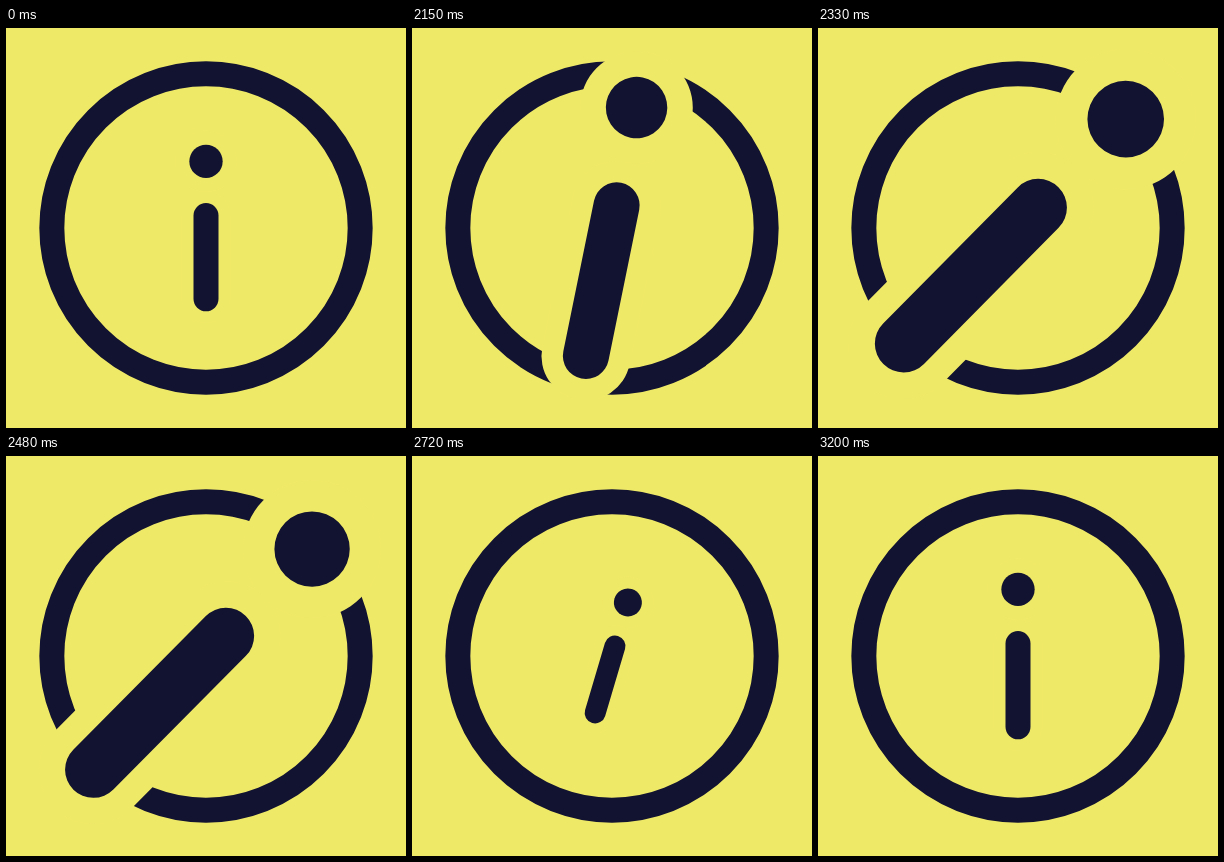
Write an HTML page that moves like this. It is 400 px wide and 400 px high and loops after 3.26 s.

```html
<!DOCTYPE html>
<html lang="en">
<head>
<meta charset="utf-8">
<title>Info icon</title>
<style>
  html, body { margin: 0; height: 100%; overflow: hidden; background: #efe968; }
  svg { display: block; width: 100%; height: 100%; }
  line { stroke-linecap: round; }
  .ink { fill: #121331; stroke: #121331; }
  .gap { fill: #efe968; stroke: #efe968; }
  circle { stroke: none; }
  .ring { fill: none; stroke: #121331; stroke-width: 25; }
</style>
</head>
<body>
<svg viewBox="0 0 400 400">
  <g transform="translate(200 200)">
    <circle class="ring" r="154.17"/>
    <g id="glyph">
      <g class="gap">
        <circle cy="-66.67" r="30.5"/>
        <line y1="-12.5" y2="70.83" stroke-width="48.2"/>
      </g>
      <g class="ink">
        <circle cy="-66.67" r="16.67"/>
        <line y1="-12.5" y2="70.83" stroke-width="25"/>
      </g>
    </g>
  </g>
</svg>
<script>
  const LOOP = 3260, START = 2000, STEP = 30;
  const glyph = document.getElementById('glyph');

  // Keys are [step, value] pairs
  const SCALE = [[0, 1], [9, 2.3], [14, 2.29], [25.5, 0.825], [40, 1]];
  const ANGLE = [[0, 0], [12.5, 45], [14, 45], [34, -12], [40, 0]];

  const ease = u => u < 0.5 ? 4 * u ** 3 : 1 - 4 * (1 - u) ** 3;

  function valueAt(keys, step) {
    const next = keys.findIndex(([at]) => at > step);
    if (next < 0) return keys[keys.length - 1][1];
    const [t0, v0] = keys[next - 1], [t1, v1] = keys[next];
    return v0 + (v1 - v0) * ease((step - t0) / (t1 - t0));
  }

  function draw() {
    const time = performance.now() % LOOP;
    const step = Math.max(0, Math.floor((time - START) / STEP));
    glyph.setAttribute('transform',
      `rotate(${valueAt(ANGLE, step)}) scale(${valueAt(SCALE, step)})`);
    requestAnimationFrame(draw);
  }
  draw();
</script>
</body>
</html>
```
